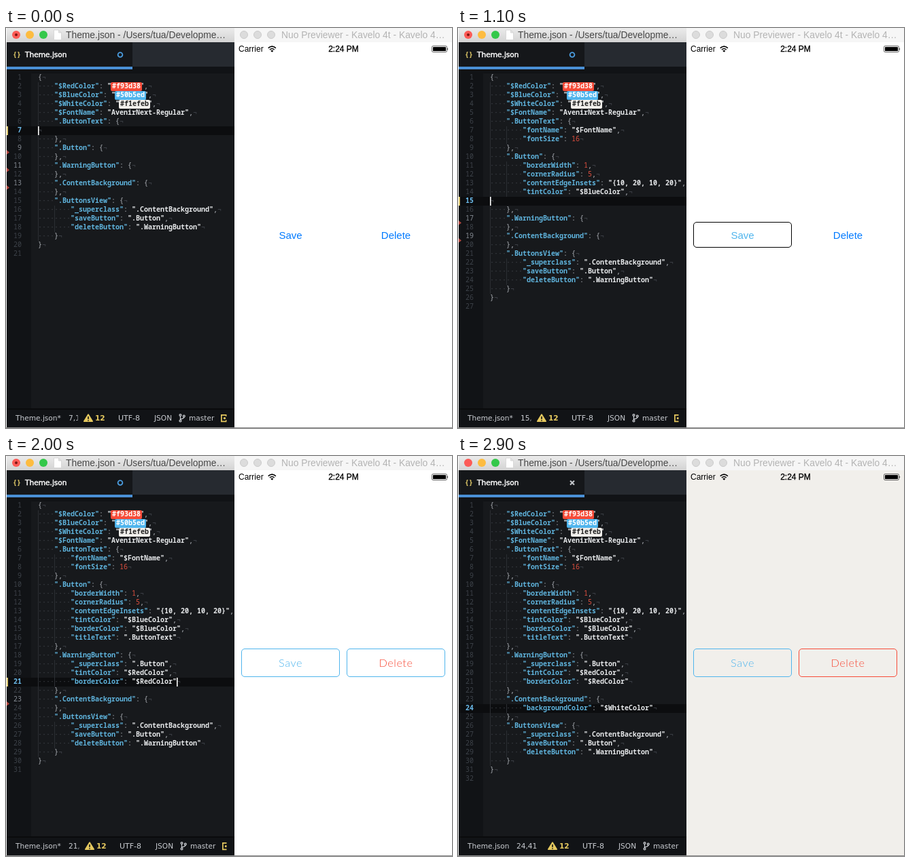
Write an HTML page that moves like this. It is 656x590 px and loops after 3 s.

```html
<!DOCTYPE html>
<html lang="en">
<head>
<meta charset="utf-8">
<title>Theme editor</title>
<style>
html, body { margin: 0; width: 100%; height: 100%; overflow: hidden; background: #fff; }
svg { display: block; width: 100%; height: 100%; }
text { white-space: pre; }
.mono { font: 10px "Noto Sans Mono", "DejaVu Sans Mono", monospace; }
.code { font-weight: 600; }
.ui { font: 10.6px "DejaVu Sans", sans-serif; fill: #c9ccd1; }
.title { font: 13.83px "Liberation Sans", Arial, sans-serif; }
.phone { font: 12px "Liberation Sans", Arial, sans-serif; }
.sys { font: 15px "Liberation Sans", Arial, sans-serif; text-anchor: middle; }
.next { font: 300 16.3px Lato, sans-serif; letter-spacing: .5px; text-anchor: middle; }
</style>
</head>
<body>
<svg viewBox="0 0 656 590" preserveAspectRatio="none">
  <defs>
    <linearGradient id="bar" x2="0" y2="1">
      <stop stop-color="#ebebeb"/><stop offset="1" stop-color="#d3d3d3"/>
    </linearGradient>
    <clipPath id="pane"><path d="M1 0H336V590H1z"/></clipPath>
    <clipPath id="edge"><path d="M300 562H324.5V589H300z"/></clipPath>
    <clipPath id="posClip"><rect id="posBox" x="80" y="562" height="27"/></clipPath>
  </defs>

  <path fill="#fff" d="M0 0H656V590H0z"/>
  <g id="phone"></g>
  <path fill="#f6f6f6" d="M336 0H656V21H336z"/>
  <g id="idle" fill="#dcdcdc" stroke="#cbcbcb"></g>
  <text class="title" x="405" y="15" fill="#b3b3b3">Nuo Previewer - Kavelo 4t - Kavelo 4…</text>
  <text class="phone" x="342" y="35">Carrier</text>
  <g fill="none" stroke="#000" stroke-width="1.6">
    <path d="M385.7 29.6Q391.3 24.6 396.9 29.6M387.9 32Q391.3 29 394.7 32"/>
    <path fill="#000" stroke="none" d="M389.2 33.6Q391.3 31.9 393.4 33.6L391.3 35.8z"/>
  </g>
  <text class="phone" x="496.5" y="35" text-anchor="middle" stroke="#000" stroke-width=".3">2:24 PM</text>
  <rect x="626.5" y="26.5" width="22" height="9" rx="1.8" fill="none" stroke="#000" stroke-width=".6"/>
  <rect x="628" y="28" width="19" height="6" rx=".6"/>
  <path d="M649.4 29.2Q651.2 31 649.4 32.8z"/>

  <g clip-path="url(#pane)">
    <path fill="#111316" d="M1 21H336V589H1z"/>
    <path fill="url(#bar)" d="M1 0H336V21H1z"/>
    <circle cx="15" cy="10" r="6" fill="#fc5b57"/>
    <circle cx="35" cy="10" r="6" fill="#fdbc40"/>
    <circle cx="55" cy="10" r="6" fill="#34c84a"/>
    <path fill="#fff" stroke="#cfcfcf" stroke-width=".7" d="M70.5 3H77.5L81.5 7V17.5H70.5zM77.5 3V7H81.5"/>
    <text class="title" x="88" y="15" fill="#474747">Theme.json - /Users/tua/Developme…</text>
    <path fill="#262a30" d="M186 21H336V57H186z"/>
    <path fill="#15171a" d="M1 21H186V57H1z"/>
    <path fill="#4a90d6" d="M1 57H186V61H1z"/>
    <text class="mono code" x="10" y="43" fill="#e8d06b">{}</text>
    <text class="ui" x="28" y="43" style="fill:#fff" stroke="#fff" stroke-width=".45">Theme.json</text>
    <path fill="#17191c" d="M37 67H336V562H37z"/>
    <g id="editor"></g>
    <path fill="#0a0b0c" d="M1 561H336V563H1z"/>
    <path fill="#111316" d="M1 563H336V589H1z"/>
    <g id="status"></g>
  </g>
  <path fill="#8b8b8b" d="M0 589H656V590H0z"/>
</svg>

<script>
const $ = id => document.getElementById(id);
const BLUE = '#50b5ed', RED = '#f74b38', PAPER = '#f1efeb';
const swatches = { '#f93d38': RED, '#50b5ed': BLUE, '#f1efeb': PAPER };
const LEFT = 47, COL = 6, ROW = 13, TOP = 67, TICK = 100, LOOP = 3000, SAVED = 24;

const head = [
  '{',
  '    "$RedColor": "#f93d38",',
  '    "$BlueColor": "#50b5ed",',
  '    "$WhiteColor": "#f1efeb",',
  '    "$FontName": "AvenirNext-Regular",'
];
const blocks = [
  ['ButtonText', '"fontName": "$FontName",', '"fontSize": 16'],
  ['Button', '"borderWidth": 1,', '"cornerRadius": 5,',
    '"contentEdgeInsets": "{10, 20, 10, 20}",', '"tintColor": "$BlueColor",',
    '"borderColor": "$BlueColor",', '"titleText": ".ButtonText"'],
  ['WarningButton', '"_superclass": ".Button",', '"tintColor": "$RedColor",', '"borderColor": "$RedColor"'],
  ['ContentBackground', '"backgroundColor": "$WhiteColor"']
];
const tail = [
  '    ".ButtonsView": {',
  '        "_superclass": ".ContentBackground",',
  '        "saveButton": ".Button",',
  '        "deleteButton": ".WarningButton"',
  '    }',
  '}',
  ''
];

// One entry per tick: block, line in block, characters typed (all if left out)
const typing = [
  [0, 1, 0], [0, 1, 12], [0, 1], [0, 2], [1, 1],
  [1, 2, 10], [1, 2], [1, 3, 10], [1, 3, 30], [1, 3], [1, 4], [1, 5, 0],
  [1, 5, 18], [1, 5], [1, 6, 14], [1, 6],
  [2, 1], [2, 2, 0], [2, 2, 13], [2, 2], [2, 3], [2, 3],
  [3, 1, 10], [3, 1, 26], [3, 1]
];

function compose(tick) {
  const [block, line, chars] = typing[tick];
  const lines = [...head], marks = [];
  let row;
  blocks.forEach(([name, ...body], b) => {
    lines.push(`    ".${name}": {`);
    if (b > block) marks.push(lines.length);
    if (b < block) body.forEach(s => lines.push('        ' + s));
    if (b === block) {
      body.slice(0, line).forEach((s, i) => {
        const part = i === line - 1 ? s.slice(0, chars) : s;
        lines.push(part && '        ' + part);
      });
      row = lines.length;
      if (b && line === 1 && tick < SAVED) marks.push(row);
    }
    lines.push('    },');
  });
  const added = tick < SAVED && !marks.includes(row);
  return { lines: lines.concat(tail), marks, row, added, col: lines[row - 1].length };
}

const textAt = (x, y, s, cls, fill, more = '') =>
  `<text class="${cls}" x="${x}" y="${y}" fill="${fill}" ${more}>${s}</text>`;
const box = (x, y, w, h, fill, more = '') =>
  `<rect x="${x}" y="${y}" width="${w}" height="${h}" fill="${fill}" ${more}/>`;

function codeLine(s, y, last) {
  const pad = s.search(/\S|$/);
  let out = '';
  for (let i = 0; i < pad; i += 4) out += box(LEFT + i * COL, y - 9, 1, ROW, '#2b2e33');
  out += textAt(LEFT, y, '·'.repeat(pad), 'mono', '#44484f');
  for (const m of s.matchAll(/"[^"]*"?|\d+|[^\s"\d]+/g)) {
    const x = LEFT + m.index * COL, tok = m[0];
    const put = (str, fill, dx = 0, cls = 'mono code') => { out += textAt(x + dx, y, str, cls, fill); };
    if (/^"#/.test(tok)) {
      const hex = tok.slice(1, -1);
      put('"', '#e6e8ea');
      put('"', '#e6e8ea', 8 * COL);
      out += box(x + 5, y - 9, 46, ROW, swatches[hex], 'rx="2"');
      put(hex, hex === PAPER ? '#222' : '#fff', COL + 1);
    } else if (tok[0] === '"') {
      put(tok, s[m.index + tok.length] === ':' ? '#5fb3dc' : '#e6e8ea');
    } else {
      put(tok, /\d/.test(tok) ? '#e2503f' : '#b0b4ba', 0, 'mono');
    }
  }
  return last ? out : out + textAt(LEFT + s.length * COL, y, '¬', 'mono', '#44484f');
}

function editor(tick) {
  const { lines, marks, row, added, col } = compose(tick);
  const top = n => TOP + (n - 1) * ROW;
  let out = box(1, top(row), 335, ROW, '#0c0d0f');
  lines.forEach((s, i) => {
    const n = i + 1, y = top(n) + 9, now = n === row;
    const fill = now ? '#6cbcec' : marks.includes(n) ? '#858b93' : '#3d4249';
    out += textAt(23, y, n, now ? 'mono code' : 'mono', fill, 'text-anchor="end"');
    out += codeLine(s, y, n === lines.length);
  });
  for (const n of marks) out += `<path fill="#b5443c" d="M1 ${top(n) + 9}l4 3.5l-4 3z"/>`;
  if (added) out += box(1, top(row), 2, ROW, '#e3cd72');
  if (tick < SAVED) out += box(LEFT + col * COL, top(row), 1.6, ROW, '#fff');
  return { out, row, col };
}

function status(tick, row, col) {
  const clean = tick >= SAVED, dx = clean ? 18 : row > 11 ? 2 : 0;
  const label = (x, s, more) => textAt(x, 579, s, 'ui', '', more);
  const gold = 'style="fill:#e6c95f;font-weight:700"';
  $('posBox').setAttribute('width', 25.5 + dx);
  let out = label(14, clean ? 'Theme.json' : 'Theme.json*')
    + `<g clip-path="url(#posClip)">${label(clean ? 86 : 92, `${row},${col + 1}`)}</g>`;
  out += `<g transform="translate(${dx} 0)">
    <path fill="#e6c95f" stroke="#e6c95f" stroke-width="1.5" stroke-linejoin="round" d="M121 570L127.3 580.2H114.7z"/>
    <path stroke="#111316" stroke-width="1.6" d="M121 573V577M121 578.2V579.8"/>`
    + label(131, '12', gold) + label(165, 'UTF-8', 'style="font-size:11px"') + label(218, 'JSON')
    + `<g fill="none" stroke="#c9ccd1" stroke-width="1.3">
      <circle cx="256.5" cy="571" r="1.4"/><circle cx="256.5" cy="579.5" r="1.4"/><circle cx="261.8" cy="572.6" r="1.4"/>
      <path d="M256.5 572.4V578M261.8 574Q261.8 576 256.5 577"/></g>`
    + label(269, 'master') + '</g>';
  if (!clean) {
    out += `<g clip-path="url(#edge)"><g transform="translate(${dx} 0)">
      <path fill="none" stroke="#e6c95f" stroke-width="1.7" d="M324 573V570.8H316.9V580.4H324V578"/>
      <circle cx="321.5" cy="575.6" r="1.7" fill="#e6c95f"/></g></g>`;
  }
  // Unsaved dots in the window button and the tab
  return out + (clean
    ? '<path stroke="#c5c8cc" stroke-width="2" d="M165 36.5L171 42.5M171 36.5L165 42.5"/>'
    : `<circle cx="15" cy="10" r="2" fill="#7c1512"/>
       <circle cx="168" cy="39.5" r="3.4" fill="none" stroke="#4a9de0" stroke-width="1.8"/>`);
}

function button(x, label, { tint = '#007aff', border, height = 30, radius = 0, next }) {
  const frame = border
    ? box(x + .5, 305 - (height - 1) / 2, 144, height - 1, 'none', `rx="${radius}" stroke="${border}"`) : '';
  return frame + textAt(x + 72.5, next ? 310.5 : 311, label, next ? 'next' : 'sys', tint);
}

function phone(tick) {
  const save = {
    border: tick >= 14 ? BLUE : tick >= 5 ? '#000' : '',
    radius: tick >= 7 ? 4.5 : 0,
    height: tick >= 16 ? 42 : tick >= 10 ? 38 : 30,
    tint: tick >= 11 ? BLUE : undefined,
    next: tick >= 16
  };
  const warn = tick < 17 ? {} : {
    ...save, tint: tick >= 20 ? RED : BLUE, border: tick >= 21 ? RED : BLUE
  };
  return box(336, 21, 320, 568, tick >= SAVED ? PAPER : '#fff')
    + button(346, 'Save', save) + button(501, 'Delete', warn);
}

$('idle').innerHTML = [350, 370, 390].map(x => `<circle cx="${x}" cy="10" r="5.5"/>`).join('');

let shown = -1;
function draw(now) {
  const tick = Math.min(SAVED, Math.floor(now % LOOP / TICK));
  if (tick !== shown) {
    shown = tick;
    const { out, row, col } = editor(tick);
    $('editor').innerHTML = out;
    $('status').innerHTML = status(tick, row, col);
    $('phone').innerHTML = phone(tick);
  }
}
const start = performance.now();
function loop() {
  draw(performance.now() - start);
  requestAnimationFrame(loop);
}
loop();
</script>
</body>
</html>
```
